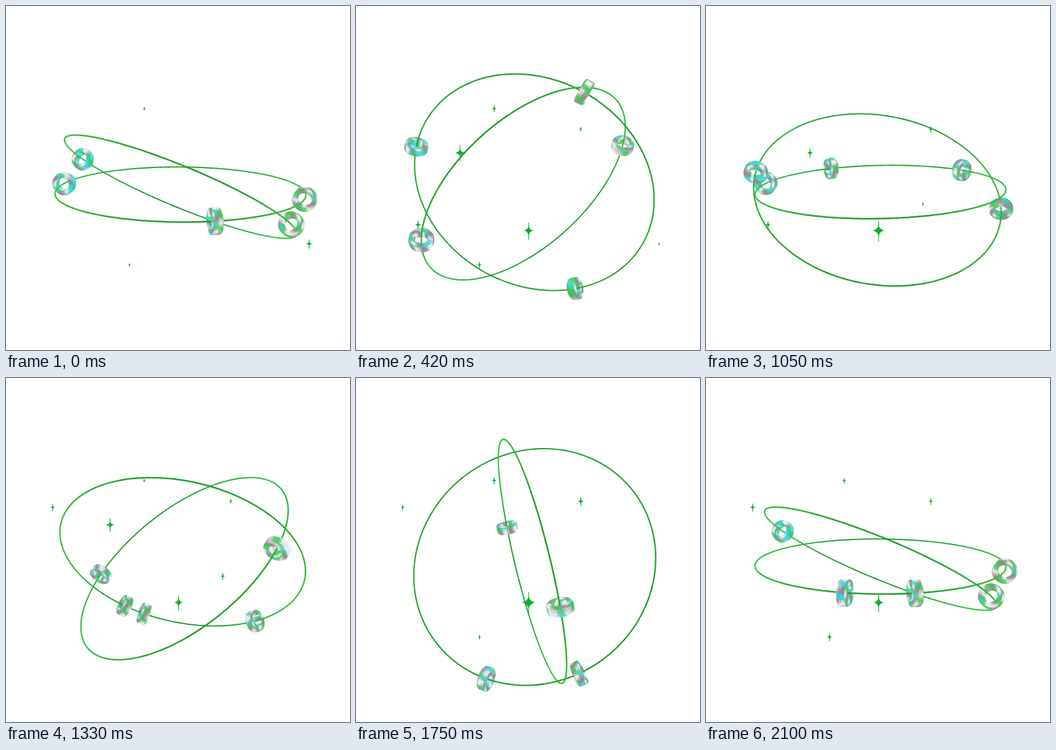
An HTML page with a canvas that plays this animation: 560 px wide and 560 px high, repeating every 2170 ms.

```html
<!DOCTYPE html>
<html>
<head>
<meta charset="utf-8">
<style>
  html, body { margin: 0; width: 100%; height: 100%; overflow: hidden; background: #fff; }
  canvas { display: block; }
</style>
</head>
<body>
<canvas id="stage" width="560" height="560"></canvas>
<script>
const ctx = document.getElementById('stage').getContext('2d');
const STEP = 70, STEPS = 31, R = 202, PERSPECTIVE = 0.15, TAU = Math.PI * 2;
const rad = d => d * Math.PI / 180;

// Vectors: x right, y down, z towards the viewer; the orbit radius is 1.
const dot = (a, b) => a[0] * b[0] + a[1] * b[1] + a[2] * b[2];
const cross = (a, b) => [a[1] * b[2] - a[2] * b[1], a[2] * b[0] - a[0] * b[2], a[0] * b[1] - a[1] * b[0]];
const unit = a => a.map(v => v / Math.hypot(...a));
const sum = (...terms) => [0, 1, 2].map(i => terms.reduce((s, [k, v]) => s + k * v[i], 0));
const spin = (v, axis, t) =>
  sum([Math.cos(t), v], [Math.sin(t), cross(axis, v)], [dot(axis, v) * (1 - Math.cos(t)), axis]);

// Each bead is [start angle, degrees per step] along its orbit.
const orbits = [
  { center: [284, 298.4], shift: 2, axis: unit([0.96, 0.053, 0.274]), normal: unit([-0.006, 0.976, -0.217]),
    turn: 12, beads: [[-60, 0], [0, 12], [182, 3]] },
  { center: [282, 299.8], shift: -1.2, axis: unit([-0.275, 0.207, 0.939]), normal: unit([-0.378, 0.912, 0.161]),
    turn: -12, beads: [[72, 12], [252, 12]] }
];

// Star: x, y, then its half height at each key step.
const keys = [0, 6, 10, 15, 19, 25, 30];
const stars = [
  [225, 167, 3, 6, 6, 0, 3, 6, 5],
  [493.5, 387, 8, 2.5, 4, 0, 0, 0, 0],
  [201, 421.5, 3, 6, 6, 0, 0, 4, 7],
  [169.5, 239, 0, 14, 9, 8, 12, 0, 0],
  [366, 200.5, 0, 4, 7, 6, 4, 8, 6],
  [101, 356, 0, 8, 11, 7, 0, 0, 0],
  [281, 365.5, 0, 15, 21, 18, 13, 20, 16],
  [353, 322.5, 0, 0, 7, 3, 6, 0, 0],
  [76, 210.5, 0, 0, 0, 0, 6, 5, 7]
];

const clamp = v => Math.max(0, Math.min(1, v));
const mix = (a, b, t) => a.map((v, i) => v + (b[i] - v) * t);
const rgb = c => `rgb(${c.map(Math.round)})`;
const power = (v, p) => Math.sign(v) * Math.abs(v) ** p;

function projector({ center, shift }, n) {
  return p => {
    const s = R / (1 - PERSPECTIVE * p[2]);
    return [center[0] + shift * n[0] + p[0] * s, center[1] + shift * n[1] + p[1] * s];
  };
}

// Iridescent metal: grey to white streaks, tinted cyan on the left and green on the right
function sheen(N, a, b, x) {
  const light = clamp(0.5 + 0.6 * Math.sin(3 * a + b + 3 * N[0]) - 0.15 * N[1]);
  const metal = mix([146, 138, 146], [238, 235, 238], light);
  const side = clamp(0.55 + 0.6 * x + 0.9 * Math.sin(3 * N[0] - 2 * N[1] + 2 * a));
  const tint = mix([44, 212, 220], [62, 196, 72], side);
  const amount = clamp(0.25 + 1.2 * Math.sin(3 * a - b + 3 * N[1] - 2 * N[0]));
  return rgb(mix(metal, mix(tint, [210, 225, 215], 0.25 * light), amount));
}

function addBead(items, project, pos, tangent, n) {
  const ROUND = 40, PROFILE = 16, mid = 14.9 / R, thick = 4.1 / R, half = 7.6 / R;
  const camera = [0, 0, 1 / PERSPECTIVE];
  const radial = a => sum([Math.cos(a), pos], [Math.sin(a), n]);
  const point = (i, j) => {
    const b = j / PROFILE * TAU;
    return sum([1, pos], [mid + thick * power(Math.cos(b), 0.5), radial(i / ROUND * TAU)],
      [half * power(Math.sin(b), 0.5), tangent]);
  };
  for (let i = 0; i < ROUND; i++) for (let j = 0; j < PROFILE; j++) {
    const a = (i + 0.5) / ROUND * TAU, b = (j + 0.5) / PROFILE * TAU;
    const N = unit(sum([power(Math.cos(b), 1.5), radial(a)], [power(Math.sin(b), 1.5), tangent]));
    const quad = [point(i, j), point(i + 1, j), point(i + 1, j + 1), point(i, j + 1)];
    if (dot(N, sum([1, camera], [-1, quad[0]])) <= 0) continue;
    items.push({ z: (quad[0][2] + quad[2][2]) / 2, color: sheen(N, a, b, pos[0]), width: 0.6, fill: true,
      path: quad.map(project) });
  }
}

function addOrbit(items, orbit, k) {
  const n = spin(orbit.normal, orbit.axis, rad(orbit.turn * k));
  const u = unit(sum([1, orbit.axis], [-dot(orbit.axis, n), n])), v = cross(n, u);
  const at = t => sum([Math.cos(t), u], [Math.sin(t), v]);
  const project = projector(orbit, n), SEGMENTS = 240;
  for (let i = 0; i < SEGMENTS; i++) {
    const t = i / SEGMENTS * TAU, p = at(t), q = at(t + TAU / SEGMENTS);
    const glow = Math.abs(at(t + TAU / 4)[2]) ** 2;
    items.push({ z: (p[2] + q[2]) / 2, color: rgb(mix([34, 160, 46], [62, 202, 70], glow)),
      width: 2.2 / (1 - PERSPECTIVE * p[2]), path: [project(p), project(q)] });
  }
  for (const [start, speed] of orbit.beads) {
    const t = rad(start + speed * k);
    addBead(items, project, at(t), at(t + TAU / 4), n);
  }
}

function drawStar([x, y, ...sizes], k) {
  const i = Math.max(0, keys.findIndex(key => key >= k) - 1);
  const s = sizes[i] + (sizes[i + 1] - sizes[i]) * (k - keys[i]) / (keys[i + 1] - keys[i]);
  if (s < 1) return;
  const r = s * 0.5, c = r * 0.2;
  ctx.fillStyle = '#0cb22e';
  ctx.beginPath();
  ctx.moveTo(x, y - r);
  ctx.quadraticCurveTo(x + c, y - c, x + r, y);
  ctx.quadraticCurveTo(x + c, y + c, x, y + r);
  ctx.quadraticCurveTo(x - c, y + c, x - r, y);
  ctx.quadraticCurveTo(x - c, y - c, x, y - r);
  ctx.fill();
  ctx.fillRect(x - 0.6, y - s * 0.85, 1.2, s * 1.85);
  ctx.fillRect(x - r, y - 0.5, r * 2, 1);
}

function draw(k) {
  ctx.fillStyle = '#fff';
  ctx.fillRect(0, 0, 560, 560);
  const items = [];
  orbits.forEach(orbit => addOrbit(items, orbit, k));
  items.sort((a, b) => a.z - b.z);
  ctx.lineCap = ctx.lineJoin = 'round';
  for (const { path, color, width, fill } of items) {
    ctx.beginPath();
    path.forEach(p => ctx.lineTo(...p));
    ctx.strokeStyle = ctx.fillStyle = color;
    ctx.lineWidth = width;
    if (fill) { ctx.closePath(); ctx.fill(); }
    ctx.stroke();
  }
  stars.forEach(star => drawStar(star, k));
}

const begin = performance.now();
let shown = -1;
function tick() {
  const k = Math.floor((performance.now() - begin) / STEP) % STEPS;
  if (k !== shown) draw(shown = k);
  requestAnimationFrame(tick);
}
tick();
</script>
</body>
</html>
```
